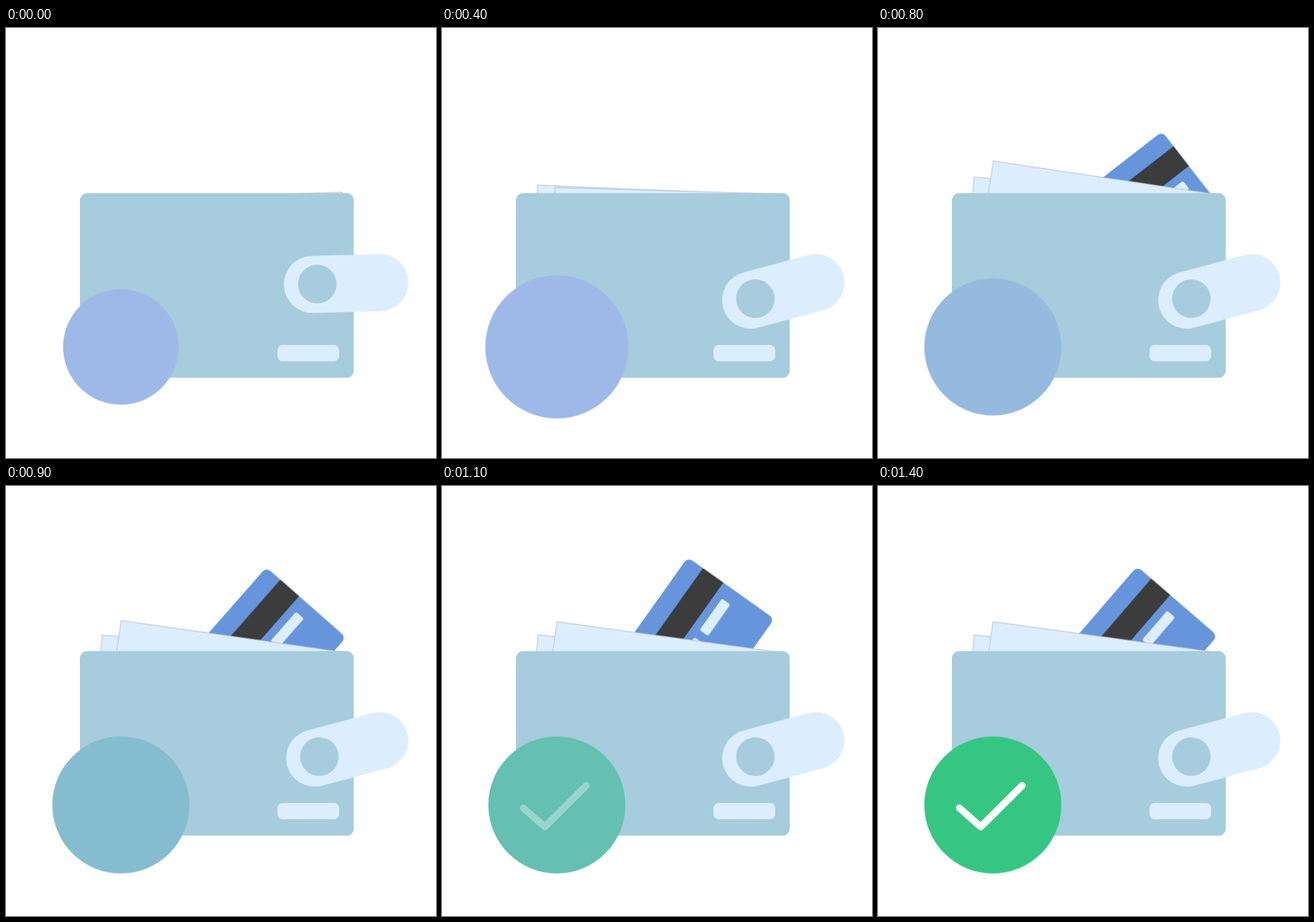
These frames come from a looping animation (640x640 px, 2.7 s). An HTML page:

```html
<!DOCTYPE html>
<html lang="en">
<head>
<meta charset="utf-8">
<title>Wallet</title>
<style>
  html, body { margin: 0; width: 100%; height: 100%; overflow: hidden; background: #fff; }
  svg { display: block; width: 100%; height: 100%; }

  /* The clock is --t in ms; on the 2 s timeline 5% is one 100 ms step. */
  .move {
    animation: 2s linear both paused;
    animation-delay: calc(var(--t, 0) * -1ms);
    transform-origin: 0 0;
  }
  #strap { animation-name: strap; }
  #back  { animation-name: back; }
  #front { animation-name: front; }
  #card  { animation-name: card; }
  #badge { animation-name: pop; }
  #disc  { animation-name: tint; }
  #tick  { animation-name: show; }

  @keyframes strap {
    0% { transform: rotate(-1.5deg); }
    5% { transform: rotate(-9.5deg); }
    10%, 100% { transform: rotate(-15deg); }
  }
  @keyframes back {
    0%, 12% { transform: rotate(-1.9deg); }
    30% { transform: rotate(8.1deg); }
    35% { transform: rotate(6.2deg); }
    40%, 100% { transform: rotate(4.9deg); }
  }
  @keyframes front {
    0%, 16% { transform: rotate(0deg); }
    30% { transform: rotate(5.8deg); }
    40% { transform: rotate(8.5deg); }
    45% { transform: rotate(8.1deg); }
    50%, 100% { transform: rotate(7.8deg); }
  }
  @keyframes card {
    0%, 20% { transform: rotate(88deg); }
    30% { transform: rotate(71.8deg); }
    35% { transform: rotate(62.2deg); }
    40% { transform: rotate(52.2deg); }
    45% { transform: rotate(41.3deg); }
    50% { transform: rotate(32.8deg); }
    55% { transform: rotate(35.4deg); }
    60% { transform: rotate(38.5deg); }
    65% { transform: rotate(40.1deg); }
    70%, 100% { transform: rotate(40.8deg); }
  }
  @keyframes pop {
    0% { transform: scale(.843); }
    5% { transform: scale(1); }
    10% { transform: scale(1.062); }
    15% { transform: scale(1.062); }
    20% { transform: scale(1.044); }
    25% { transform: scale(1.023); }
    30% { transform: scale(1.007); }
    35% { transform: scale(1.001); }
    40%, 100% { transform: scale(1); }
  }
  @keyframes tint {
    0%, 37% { fill: #9eb9e7; }
    70%, 100% { fill: #36c684; }
  }
  @keyframes show {
    0%, 47.5% { opacity: 0; }
    70%, 100% { opacity: 1; }
  }

  .pale { fill: #dceefd; }
  .teal { fill: #a6ccdd; }
  .paper { fill: #dceefd; stroke: #b3bcc6; stroke-width: 1; }
</style>
</head>
<body>
<svg viewBox="0 0 640 640">
  <g transform="translate(232.3 323.5)">
    <g id="card" class="move">
      <g transform="translate(-17.1 -254.4)">
        <rect width="158" height="240" rx="8.5" fill="#6695dc"/>
        <rect x="27.8" width="37.2" height="240" fill="#3c3c3c"/>
        <rect class="pale" x="77" y="20.5" width="15.5" height="57.5" rx="3"/>
        <rect class="pale" x="77" y="91" width="15.5" height="30" rx="3"/>
      </g>
    </g>
  </g>

  <g transform="translate(433 246.6)">
    <rect id="back" class="move paper" x="-291" width="358" height="150"/>
  </g>
  <g transform="translate(500 247)">
    <rect id="front" class="move paper" x="-332" width="332" height="150"/>
  </g>

  <rect class="teal" x="110" y="245.8" width="407.6" height="274.8" rx="11"/>
  <rect class="pale" x="404" y="471.8" width="92" height="24.2" rx="8"/>

  <g transform="translate(556.5 379)">
    <g id="strap" class="move">
      <rect class="pale" x="-143" y="-42.5" width="185.5" height="85" rx="42.5"/>
      <circle class="teal" cx="-93.2" cy="-.3" r="28.7"/>
    </g>
  </g>

  <g transform="translate(170.9 474.7)">
    <g id="badge" class="move">
      <circle id="disc" class="move" r="102"/>
    </g>
  </g>
  <path id="tick" class="move" d="M121.2 479.3 153 507.3 214.7 445.8" fill="none" stroke="#fff"
        stroke-width="10.4" stroke-linecap="round" stroke-linejoin="round"/>
</svg>
<script>
  const LOOP = 2700, STEP = 100, REST = 1400;
  const start = performance.now();
  let shown = 0;

  function tick() {
    const time = (performance.now() - start) % LOOP;
    const t = Math.min(REST, Math.floor(time / STEP) * STEP);
    if (t !== shown) {
      shown = t;
      document.documentElement.style.setProperty("--t", t);
    }
    requestAnimationFrame(tick);
  }
  requestAnimationFrame(tick);
</script>
</body>
</html>
```
